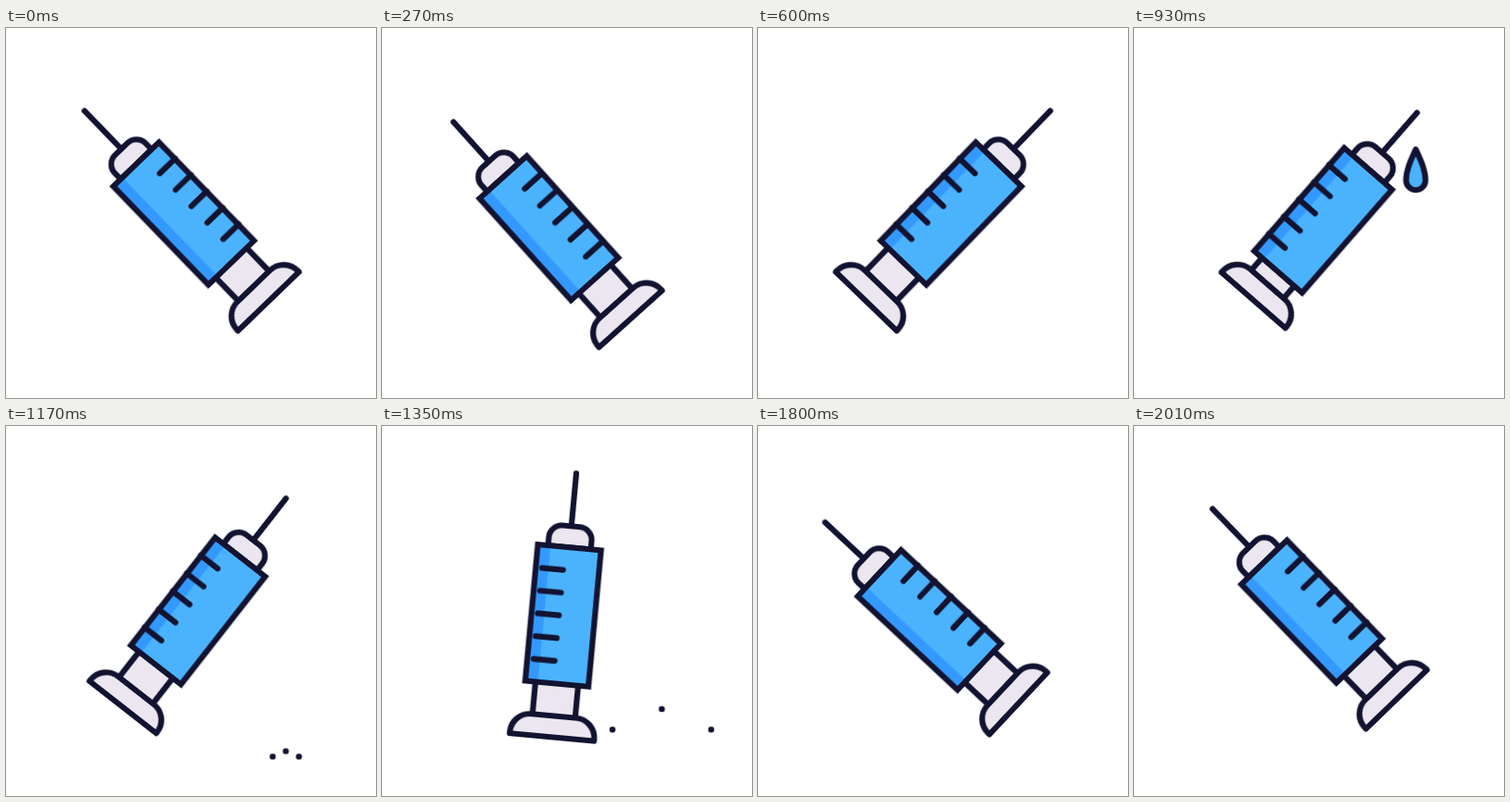
Write an HTML page without scripts that moves like this. It is 400x400 px and loops after 4.07 s.

```html
<!DOCTYPE html>
<html lang="en">
<head>
<meta charset="utf-8">
<title>Syringe</title>
<style>
  html, body { margin: 0; width: 100%; height: 100%; overflow: hidden; background: #fff; }
  svg { display: block; width: 100%; height: 100%; }

  .line { fill: none; stroke: #121331; stroke-width: 6.2; stroke-linecap: round; }
  .round { stroke-linejoin: round; }
  .blue { fill: #4bb3fd; }
  .shade { fill: #3399ff; }
  .grey { fill: #ebe6ef; }
  .dot { fill: #121331; }

  .pos, .tilt, .ticks, .plunger, .drop, .drop path, .dot {
    animation: 4070ms cubic-bezier(.333, 0, .667, 1) infinite;
  }
  .pos { animation-name: pos; }
  .tilt { animation-name: tilt; }
  .ticks { animation-name: ticks; }
  .plunger { animation-name: press; }
  .drop { animation-name: fall; }
  .drop path { animation-name: grow; }
  .dot { animation-name: splash, shrink; }

  /* wind up, swing over, squeeze, swing back, settle */
  @keyframes pos {
    0%, 14.742%, 26.536%, 28.01%, 49.14%, 100% { transform: translate(200.4px, 209.2px); }
    4.914%, 39.312% { transform: translate(187.4px, 226.7px); }
    22.85% { transform: translate(196.6px, 217px); }
  }
  @keyframes tilt {
    0%, 49.14%, 100% { transform: rotate(-44deg); }
    4.914%, 39.312% { transform: rotate(-49.8deg); }
    14.742% { transform: rotate(44deg); }
    22.85% { transform: rotate(41.1deg); }
    28.87% { transform: rotate(38deg); }
  }
  @keyframes ticks {
    0%, 5.504%, 39.312%, 100% { transform: translateX(0); }
    13.612%, 31.204% { transform: translateX(-46px); }
  }
  @keyframes press {
    0%, 14.742%, 27.5%, 100% { transform: translateY(0); }
    22.85% { transform: translateY(-17.4px); }
  }

  @keyframes fall {
    0%, 21.13% { transform: translate(305px, 88.5px); }
    27.813%, 100% { transform: translate(302.5px, 341px); }
  }
  @keyframes grow {
    0%, 19.656% { transform: scale(0); }
    21.9%, 27.8% { transform: scale(1); }
    27.82%, 100% { transform: scale(0); }
  }
  @keyframes splash {
    0%, 27.764% {
      transform: translate(302.5px, 368px);
      animation-timing-function: cubic-bezier(.333, .667, .667, 1);
    }
    35.627%, 100% { transform: translate(var(--x), var(--y)); }
  }
  @keyframes shrink {
    0%, 27.764% { r: 0; }
    27.78%, 34.644% { r: 3.3px; }
    35.627%, 100% { r: 0; }
  }
</style>
</head>
<body>
<svg viewBox="0 0 400 400">
  <g class="drop">
    <path class="line round blue" d="M0 0C5 11 10.5 22 10.5 33.5A10.5 10.5 0 0 1 -10.5 33.5C-10.5 22 -5 11 0 0Z"/>
  </g>
  <circle class="dot" style="--x:243.5px; --y:324px"/>
  <circle class="dot" style="--x:302.5px; --y:299.5px"/>
  <circle class="dot" style="--x:361.5px; --y:324px"/>

  <g class="pos">
    <g class="tilt">
      <g class="plunger">
        <path class="line grey" d="M-23.2 97V50H23.2V97"/>
        <path class="line round grey" d="M-45.8 120V118.5A21.5 21.5 0 0 1 -24.3 97H24.3A21.5 21.5 0 0 1 45.8 118.5V120Z"/>
      </g>
      <path class="line" d="M0 -109V-166.5"/>
      <path class="line grey" d="M-23.2 -86V-95A14 14 0 0 1 -9.2 -109H9.2A14 14 0 0 1 23.2 -95V-86Z"/>
      <path class="blue" d="M-34.3 -86H34.3V62H-34.3Z"/>
      <path class="shade" d="M-34.3 -86H-20.5V62H-34.3Z"/>
      <path class="line ticks" d="M11.5 -61.2h23m-23 24.7h23m-23 24.7h23m-23 24.7h23m-23 24.7h23"/>
      <path class="line" d="M-34.3 -86H34.3V62H-34.3Z"/>
    </g>
  </g>
</svg>
</body>
</html>
```
